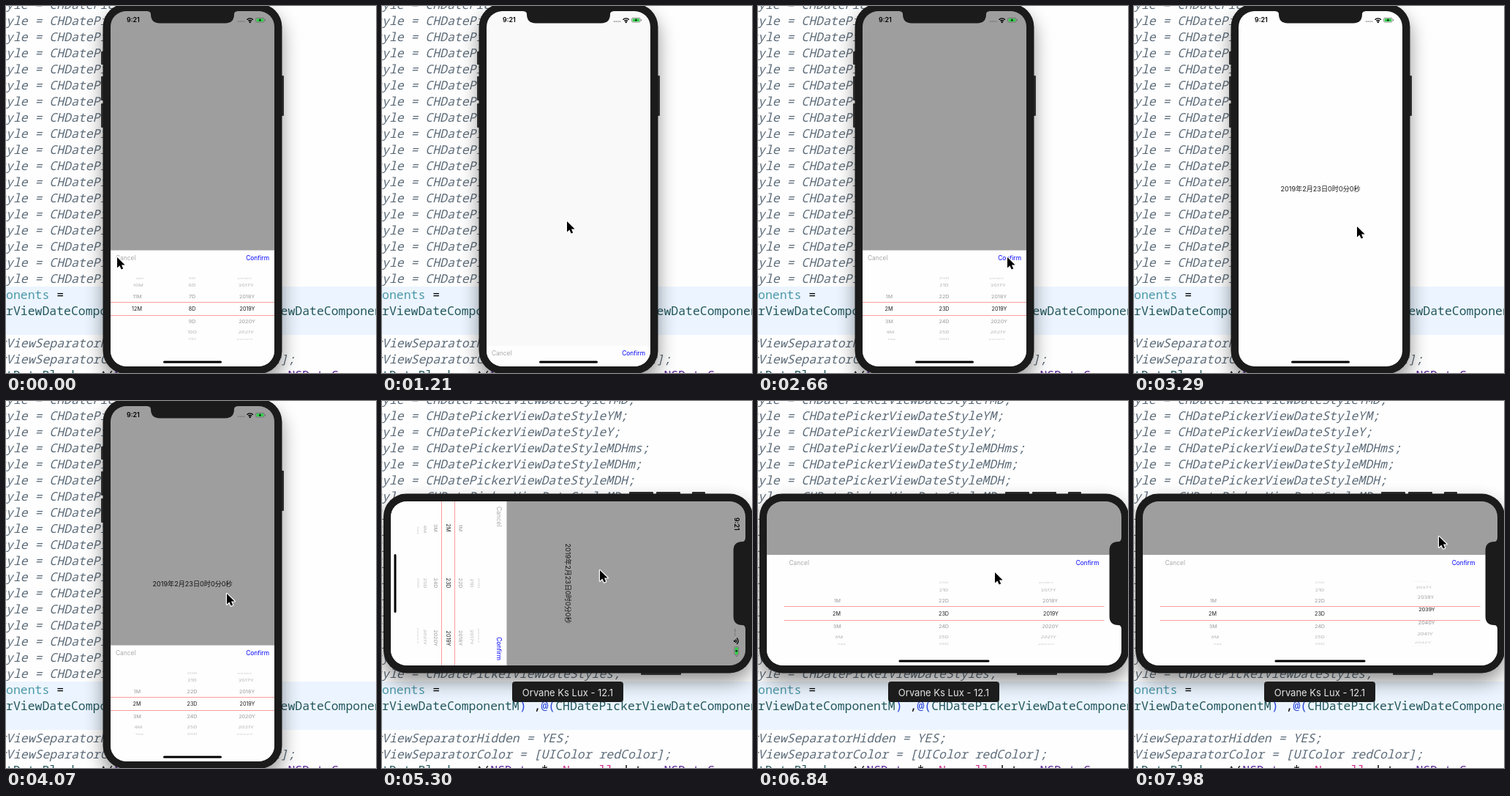
Recreate the animation shown at these times as an HTML page. Size 506x501 px, loop 8000 ms.

```html
<!DOCTYPE html>
<html lang="en">
<head>
<meta charset="utf-8">
<title>Date picker demo</title>
<style>
  html, body { margin: 0; width: 100%; height: 100%; overflow: hidden; background: #fefefe; }
  svg { display: block; width: 100vw; height: 100vh; }
  text { font-family: Inter, "Noto Sans CJK SC", "Noto Sans CJK", sans-serif; }
  .code text { font: 16.48px "Noto Sans Mono", "DejaVu Sans Mono", monospace; fill: #000; }
  .code .note { font-style: italic; fill: #5d6c79; }
  .shadow { filter: blur(13px); opacity: .43; }
  .row { font-size: 7.2px; text-anchor: middle; }
  .button { font-size: 8.4px; }
</style>
</head>
<body>
<svg viewBox="0 0 506 501" xmlns="http://www.w3.org/2000/svg">
  <defs>
    <clipPath id="screen"><rect x="143" y="7" width="224" height="485" rx="21.5"/></clipPath>
    <clipPath id="wheels"><rect x="-250" y="36.5" width="500" height="88"/></clipPath>
  </defs>

  <rect y="383" width="506" height="66" fill="#ecf5ff"/>
  <g class="code" id="code"></g>

  <rect class="shadow" id="shadowTall" x="133" y="10" width="244" height="505" rx="32"/>
  <rect class="shadow" id="shadowWide" x="2" y="139" width="505" height="244" rx="32"/>

  <g id="device">
    <g id="keys" fill="#2b2b2b"></g>
    <rect x="132.5" y="-3" width="245" height="505" rx="31.5" fill="#1b1b1b"/>
    <g clip-path="url(#screen)">
      <rect x="143" y="7" width="224" height="485"/>
      <g id="ui">
        <rect id="page" fill="#fefefe"/>
        <text id="result" lang="zh-CN" y="3.5" font-size="9.1" fill="#1c1c1c" text-anchor="middle">2019年2月23日0时0分0秒</text>
        <rect id="dim"/>
        <g id="sheet">
          <rect id="panel" height="160" fill="#fefefe"/>
          <text id="cancel" class="button" y="13.5" fill="#a9a9a9">Cancel</text>
          <text id="confirm" class="button" y="13.5" fill="#00f" text-anchor="end">Confirm</text>
          <g id="rows" clip-path="url(#wheels)"></g>
          <path id="lines" stroke="#ff9c9c" fill="none"/>
        </g>
        <g id="status">
          <text x="-90" y="15.2" font-size="8.8" font-weight="600">9:21</text>
          <path d="M62 14.2h9.5" stroke="#666" stroke-width="1.3" stroke-dasharray="1.4 1.2"/>
          <g transform="translate(78.7 15)" fill="none" stroke="#000" stroke-width="1.4">
            <path d="M-4.2-3.2A5.6 5.6 0 0 1 4.2-3.2M-2.3-1.5A3.2 3.2 0 0 1 2.3-1.5"/>
            <circle r=".5"/>
          </g>
          <rect x="86.5" y="9.3" width="11.6" height="5.8" rx="1.6" fill="none" stroke="#666" stroke-width=".7"/>
          <rect x="87.5" y="10.2" width="9.6" height="4" rx=".8" fill="#32d04b"/>
          <path d="M99 11v2.4q1-.3 1-1.2t-1-1.2" fill="#666"/>
          <path d="M93 9.8l-2.4 2.9h1.5l-.6 2 2.6-2.9h-1.6z"/>
        </g>
        <rect id="home" height="3" rx="1.5"/>
      </g>
    </g>
    <path d="M193 6V7Q198 7.5 198 11Q198 23.4 210 23.4H300Q312 23.4 312 11Q312 7.5 317 7V6Z" fill="#1b1b1b"/>
  </g>

  <g id="tip">
    <rect x="178" y="383" width="152" height="28" rx="4" fill="#1c1c1d"/>
    <text x="254" y="402.5" font-size="13" fill="#e4e4e4" text-anchor="middle">Orvane Ks Lux - 12.1</text>
  </g>

  <path id="cursor" d="M0 0V14.5L3.4 11.4L5.7 16.6L8.2 15.5L6 10.4H10.6Z"
        stroke="#fff" stroke-width="2.4" stroke-linejoin="round" paint-order="stroke"/>
</svg>

<script>
const LOOP = 8000;
const $ = id => document.getElementById(id);
function set(node, attrs) {
  for (const key in attrs) node.setAttribute(key, attrs[key]);
}
function add(tag, parent, attrs) {
  const node = document.createElementNS("http://www.w3.org/2000/svg", tag);
  set(node, attrs);
  return parent.appendChild(node);
}
const show = (id, on) => { $(id).style.display = on ? "" : "none"; };
const mix = (a, b, p) => a + (b - a) * p;
const progress = (t, start, span) => Math.min(1, Math.max(0, (t - start) / span));
const ease = p => (1 - Math.cos(Math.PI * p)) / 2;
const easeOut = p => 1 - (1 - p) ** 2;

// Code behind the device
const LINE = 22, CHAR = 9.89;
function codeLine(row, parts) {
  const text = add("text", $("code"), { x: 0, y: row * LINE + 4 });
  for (const [str, fill] of parts) {
    add("tspan", text, fill ? { fill } : {}).textContent = str;
  }
  return text;
}
function noteLine(row, str) {
  set(codeLine(row, [[str]]), { x: -CHAR, class: "note" });
}
const styles = ["YMD", "YM", "Y", "MDHms", "MDHm", "MDH", "MD"];
for (let row = 0; row < 18; row++) {
  const end = row === 17 ? "s" : styles[row] || "";
  noteLine(row, `tyle = CHDatePickerViewDateStyle${end};`);
}
const TEAL = "#23575c", BLUE = "#2a45d8", PURPLE = "#5c2699";
codeLine(18, [["onents", "#4b98a8"], [" ="]]);
codeLine(19, [["rViewDateComponentM", TEAL], [")", BLUE], [" ,"], ["@(", BLUE],
  ["CHDatePickerViewDateComponentD", TEAL]]);
noteLine(21, "rViewSeparatorHidden = YES;");
noteLine(22, "rViewSeparatorColor = [UIColor redColor];");
codeLine(23, [["tDateBlock", TEAL], [" = ^("], ["NSDate", PURPLE], [" * "], ["_Nonnull", "#d12f8c"],
  [" date, "], ["NSDateComponents", PURPLE]]);

// Side keys: x, y, height
for (const [x, y, height] of [[130, 62, 18], [130, 96, 33], [130, 133, 33], [375, 95, 55]]) {
  add("rect", $("keys"), { x, y, height, width: 5, rx: 1 });
}

// Pointer glides: start, span, x, y
const HOME = [152, 343];
const glides = [
  [40, 160, 154, 339], [560, 440, 253, 294], [1500, 460, 281, 418], [2150, 500, 341, 343],
  [3060, 230, 305, 301], [3300, 280, 302, 263], [5299, 1, 298, 231], [6800, 40, 324, 234],
  [6890, 350, 448, 268], [7240, 350, 412, 299], [7640, 210, 415, 168], [7850, 130, 417, 185]
];
const pointer = t => glides.reduce(([px, py], [start, span, x, y]) => {
  const p = ease(progress(t, start, span));
  return [mix(px, x, p), mix(py, y, p)];
}, HOME);

// The sheet starts open and flips at each tap; its first drawn step is already under way.
const CANCEL_AT = 370, CONFIRM_AT = 3080, TURN_AT = 5300;
const taps = [CANCEL_AT, 1210, CONFIRM_AT, 3840];
function sheetUp(t) {
  const past = taps.filter(tap => tap <= t);
  if (!past.length) return 1;
  const p = ease(progress(t, past.at(-1) - 78, 285));
  return past.length % 2 ? 1 - p : p;
}
const turn = t => ease(progress(t, 5460, 540));
const year = t => 2019 + 20.31 * easeOut(progress(t, 7640, 340));
const monthDay = t => t < CANCEL_AT + 400 ? [12, 8] : [2, 23];

// Picker wheels
const STEP = .39, RADIUS = 45.5, MID = 80;
const wheels = [
  { unit: "M", max: 12, side: -1 },
  { unit: "D", max: 31, side: 0 },
  { unit: "Y", max: 9999, side: 1 }
];
for (const wheel of wheels) {
  wheel.rows = Array.from({ length: 9 }, () => add("text", $("rows"), { class: "row", y: 2.6 }));
}
function drawWheel({ unit, max, side, rows }, value, p) {
  const center = side * mix(75.5, 146.5, p) - .5;
  const bend = -side * mix(6, 11, p);
  rows.forEach((row, i) => {
    const n = Math.round(value) + i - 4;
    const off = n - value, angle = off * STEP;
    const sin = Math.sin(angle), cos = Math.cos(angle);
    const gray = Math.abs(off) < .5 ? 30 : 128 + 24 * Math.abs(off);
    row.style.display = n >= 1 && n <= max && cos > .07 ? "" : "none";
    row.textContent = n + unit;
    set(row, {
      fill: `rgb(${gray},${gray},${gray})`,
      transform: `matrix(1 0 ${bend * sin / RADIUS} ${cos} ${center + bend * (1 - cos)} ${MID + RADIUS * sin})`
    });
  });
}

function draw(t) {
  const wide = t >= TURN_AT, p = turn(t), up = sheetUp(t);
  const w = mix(224, 485, p), h = mix(485, 224, p);
  const full = { x: -w / 2, y: -h / 2, width: w, height: h };

  set($("device"), { transform: `rotate(${wide ? 90 : 0} 255 249)` });
  show("shadowTall", !wide);
  show("shadowWide", wide);
  show("tip", wide);
  show("result", t >= CONFIRM_AT);
  show("sheet", up > 0);

  set($("ui"), { transform: `translate(255 249.5) rotate(${-90 * p})` });
  set($("page"), full);
  set($("dim"), { ...full, opacity: .38 * up ** 1.7 });
  set($("status"), { transform: `translate(0 ${-h / 2})`, opacity: Math.max(0, 1 - 2 * p) });
  const bar = mix(80, 124, p);
  set($("home"), { x: -bar / 2, y: h / 2 - 7.5, width: bar });

  set($("sheet"), { transform: `translate(0 ${h / 2 - up * mix(158.5, 151, p)})` });
  set($("panel"), { x: -w / 2, width: w });
  const edge = w / 2 - mix(7, 30.5, p), rule = w / 2 - mix(0, 23.5, p);
  set($("cancel"), { x: -edge });
  set($("confirm"), { x: edge });
  set($("lines"), { d: `M${-rule} ${mix(71, 70.5, p)}H${rule}M${-rule} ${mix(89, 89.5, p)}H${rule}` });
  [...monthDay(t), year(t)].forEach((value, i) => drawWheel(wheels[i], value, p));

  set($("cursor"), { transform: `translate(${pointer(t).join(" ")})` });
}

const start = performance.now();
function tick() {
  draw((performance.now() - start) % LOOP);
  requestAnimationFrame(tick);
}
tick();
</script>
</body>
</html>
```
